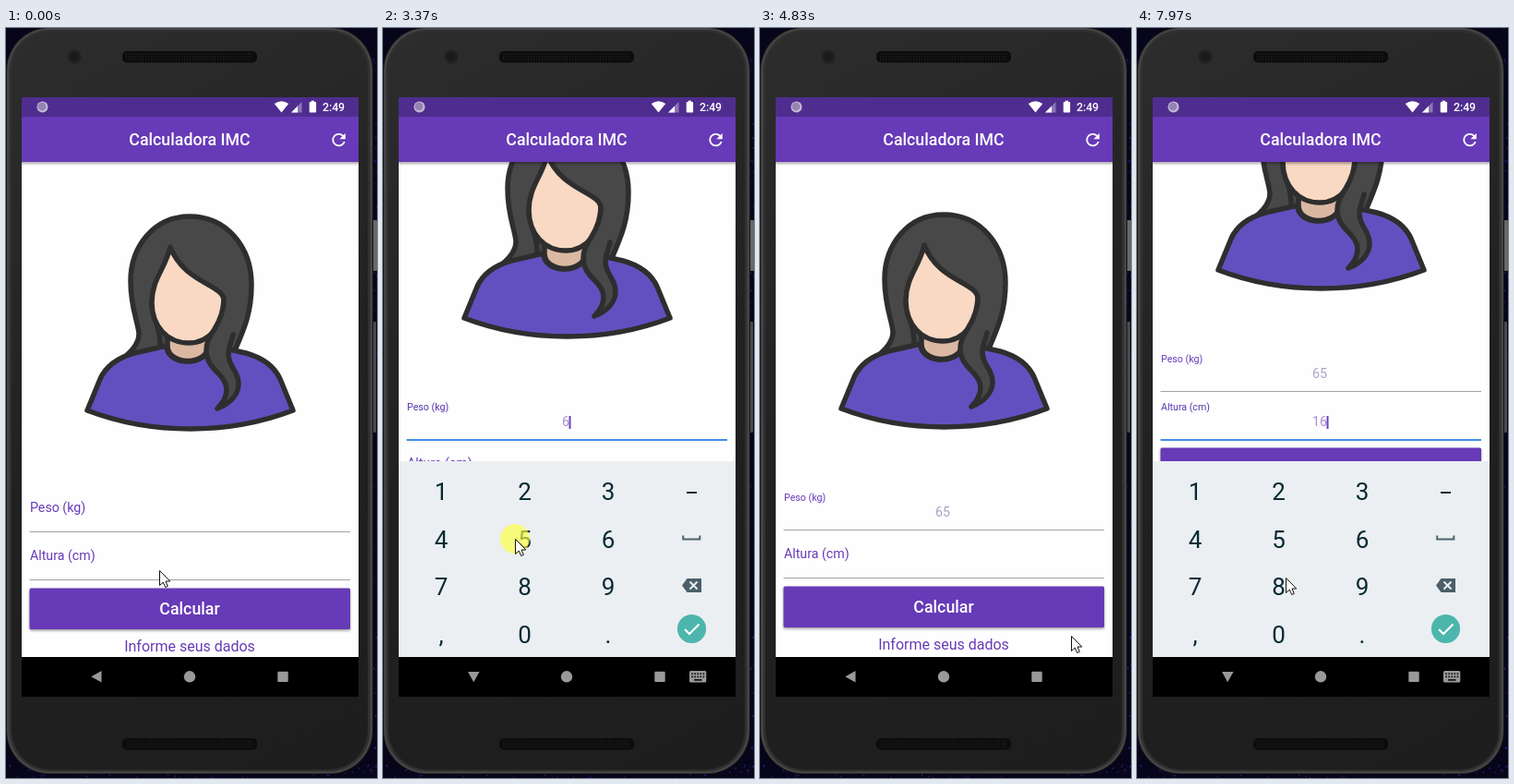
Recreate the animation shown at these times as an HTML page with a canvas. Size 402x812 px, loop 8 s.

```html
<!DOCTYPE html>
<html lang="pt">
<head>
<meta charset="utf-8">
<title>Calculadora IMC</title>
<style>
html, body { margin: 0; width: 100%; height: 100%; overflow: hidden; background: #06051a; }
canvas { display: block; }
</style>
</head>
<body>
<canvas id="stage" width="402" height="812"></canvas>
<script>
const ctx = document.getElementById('stage').getContext('2d');
const LOOP = 8000;
const PURPLE = '#673ab7';
const SCREEN = { x: 17, y: 75, w: 365, h: 649 };
const NAV_TOP = 681;

const clamp = v => Math.max(0, Math.min(1, v));
const ramp = (t, a, b) => clamp((t - a) / (b - a));
const smooth = u => u * u * (3 - 2 * u);
const easeOut = u => 1 - (1 - u) * (1 - u);
const mix = (a, b, u) => a + (b - a) * u;
const within = (t, a, b) => t >= a && t < b;

// Shape helpers
function box(x, y, w, h, color) {
  ctx.fillStyle = color;
  ctx.fillRect(x, y, w, h);
}
function round(x, y, w, h, r, color) {
  ctx.fillStyle = color;
  ctx.beginPath();
  ctx.roundRect(x, y, w, h, r);
  ctx.fill();
}
function disc(x, y, r, color) {
  ctx.fillStyle = color;
  ctx.beginPath();
  ctx.arc(x, y, r, 0, 7);
  ctx.fill();
}
function poly(points, color) {
  ctx.fillStyle = color;
  ctx.beginPath();
  points.forEach(([x, y]) => ctx.lineTo(x, y));
  ctx.closePath();
  ctx.fill();
}
function line(points, color, width = 2) {
  ctx.strokeStyle = color;
  ctx.lineWidth = width;
  ctx.lineCap = 'butt';
  ctx.lineJoin = 'miter';
  ctx.beginPath();
  points.forEach(([x, y]) => ctx.lineTo(x, y));
  ctx.stroke();
}
function text(s, x, y, size, color, align = 'center', weight = 400) {
  ctx.font = `${weight} ${size}px Roboto, sans-serif`;
  ctx.textAlign = align;
  ctx.fillStyle = color;
  ctx.fillText(s, x, y);
}
function outlined(path, fill) {
  ctx.fillStyle = fill;
  ctx.fill(path);
  ctx.strokeStyle = '#2e2e2e';
  ctx.lineWidth = 5.5;
  ctx.lineJoin = ctx.lineCap = 'round';
  ctx.stroke(path);
}

// Timeline: pointer moves are [start, end, x, y]
const MOVES = [
  [50, 330, 166, 525], [1860, 2180, 236, 560], [2700, 3300, 143, 553],
  [3520, 3980, 337, 658], [4980, 5240, 213, 588], [5980, 6450, 69, 509],
  [6860, 7350, 226, 551], [7790, 7970, 161, 595]
];
const CLICKS = [840, 2190, 3350, 4030, 5390, 6470, 7390];
const PRESSES = [[2260, 2400, 2, 1], [3430, 3520, 1, 1], [6540, 6760, 0, 0], [7460, 7600, 2, 1]];
const WEIGHT_FOCUS = 1030, HEIGHT_FOCUS = 5480, HIDE = 4160, RELEASE = 4318;
const TYPED = { weight: [[2340, '6'], [3480, '65']], height: [[6700, '1'], [7570, '16']] };

function pointer(t) {
  let [x, y] = [166, 587];
  for (const [a, b, nx, ny] of MOVES) {
    const u = smooth(ramp(t, a, b));
    x = mix(x, nx, u);
    y = mix(y, ny, u);
  }
  return [x, y];
}

// The page springs back once the keyboard is gone
function scroll(t) {
  if (t < RELEASE) {
    return 98 * easeOut(ramp(t, 1080, 1230)) + 2 * ramp(t, 2340, 2440);
  }
  if (t < 5400) {
    const s = (t - RELEASE) / 1000, fast = 22, slow = 9.08;
    return 100 * (fast * Math.exp(-slow * s) - slow * Math.exp(-fast * s)) / (fast - slow);
  }
  return 150 * easeOut(ramp(t, 5600, 5740)) + 2 * ramp(t, 6700, 6790);
}

function keyboardShown(t) {
  if (t < HIDE) return easeOut(ramp(t, 950, 1200));
  if (t < 5000) return 1 - smooth(ramp(t, HIDE, 4350));
  return easeOut(ramp(t, 5500, 5740));
}

function valueAt(list, t) {
  return list.reduce((v, [at, s]) => t >= at ? s : v, '');
}
function caretOn(list, focus, t) {
  const since = list.reduce((v, [at]) => t >= at ? at : v, focus);
  return Math.floor((t - since) / 500) % 2 === 0;
}

// Phone shell
function drawShell() {
  box(0, 0, 402, 812, '#06051a');
  let seed = 11;
  const rnd = () => (seed = seed * 16807 % 2147483647) / 2147483647;
  for (let i = 0; i < 260; i++) {
    const right = i % 2;
    const x = right ? 394 + rnd() * 8 : rnd() * 402;
    const y = right ? rnd() * 812 : 796 + rnd() * 16;
    box(x, y, 1 + rnd(), 1 + rnd(), `rgba(${50 + rnd() * 50},45,${140 + rnd() * 90},${rnd() * 0.7})`);
  }
  round(397, 208, 5, 55, 1, '#686868');
  round(397, 318, 4, 120, 1, '#4c4c4c');
  round(0, -1, 398, 809, 47, '#151515');
  round(1, 0, 396, 807, 46, '#454545');
  round(3.5, 2, 391, 803, 44, '#303030');
  const body = ctx.createLinearGradient(0, 0, 402, 812);
  body.addColorStop(0, '#2d2d2d');
  body.addColorStop(0.5, '#212121');
  body.addColorStop(1, '#1d1d1d');
  round(6, 4, 386, 799, 42, body);
  for (const y of [25, 769]) {
    round(126, y, 146, 12.5, 5, '#0c0c0c');
    for (let i = 0; i < 46; i++)
      for (let j = 0; j < 3; j++) box(130 + i * 3, y + 2.5 + j * 3, 1.3, 1.3, '#242424');
  }
  disc(74, 31, 7.5, '#202020');
  disc(74, 31, 4.5, '#1a1a1e');
}

const REFRESH = new Path2D('M17.65 6.35C16.2 4.9 14.21 4 12 4c-4.42 0-7.99 3.58-7.99 8s3.57 8 7.99 8c3.73 0 6.84-2.55 7.73-6h-2.08c-.82 2.33-3.04 4-5.65 4-3.31 0-6-2.69-6-6s2.69-6 6-6c1.66 0 3.14.69 4.22 1.78L13 11h7V4z');

function drawBars() {
  const shade = ctx.createLinearGradient(0, 145, 0, 149);
  shade.addColorStop(0, 'rgba(0,0,0,.32)');
  shade.addColorStop(1, 'rgba(0,0,0,0)');
  box(17, 145, 365, 4, shade);
  box(17, 75, 365, 21, '#4f2d8f');
  box(17, 96, 365, 49, PURPLE);

  disc(39.5, 85.5, 6, '#c4b9d6');
  disc(39, 85, 4.4, '#9483b3');
  ctx.fillStyle = '#fff';
  ctx.beginPath();
  ctx.moveTo(298.5, 91.5);
  ctx.lineTo(290.8, 82);
  ctx.quadraticCurveTo(298.5, 76.5, 306.2, 82);
  ctx.fill();
  poly([[309, 91.5], [320.5, 91.5], [320.5, 80]], 'rgba(255,255,255,.35)');
  poly([[309, 91.5], [316, 91.5], [316, 84.5]], '#fff');
  round(328.7, 80, 7.4, 11.6, 1, '#fff');
  box(330.7, 78.7, 3.4, 2, '#fff');
  text('2:49', 355, 90, 12.3, '#fff', 'center', 500);

  text('Calculadora IMC', 199, 127, 17.76, '#fff', 'center', 500);
  ctx.save();
  ctx.translate(360.6, 121.1);
  ctx.scale(0.9, 0.9);
  ctx.translate(-12, -12);
  ctx.fillStyle = '#fff';
  ctx.fill(REFRESH);
  ctx.restore();
}

// Avatar
const HAIR = new Path2D('M199 204C160 204 135 237 135 274C135 303 143 318 144 331C144 343 134 352 124 360L178 348L222 350L248 349C258 326 266 308 266 278C266 237 239 204 199 204Z');
const SHIRT = new Path2D('M174 344L139 352C121 357 108 367 102 380L88 414C122 427 160 434 199.5 434C239 434 277 427 311 414L297 380C291 367 278 357 260 352L220 343C220 367 174 367 174 344Z');
const NECK = new Path2D('M175 330V344C175 366 219 366 219 344V330Z');
const FACE = new Path2D('M178 237C173 260 158 272 158 297C158 323 175 341 198 341C221 341 236 321 236 294C234 277 193 276 178 237Z');
const LOCK = new Path2D('M236 294C236 305 232 316 226 326C221 334 217 340 217 349C217 370 238 374 239 391C239 400 235 406 229 412C244 406 252 396 252 385C252 371 241 367 241 353C241 343 245 339 246 332');
const STRAND = new Path2D('M158 297C158 313 168 323 167 345');

function drawAvatar() {
  outlined(HAIR, '#484848');
  ctx.stroke(STRAND);
  outlined(NECK, '#dbb8a2');
  outlined(SHIRT, '#6350c0');
  outlined(FACE, '#f9d9c3');
  outlined(LOCK, '#484848');
}

// Form
function drawField(label, value, top, up, focused, caret) {
  const size = mix(14.2, 10.65, up);
  text(label, 26, top + mix(524.3, 513.7, up), size, focused ? '#5535ab' : PURPLE, 'left');
  if (value) text(value, 198, top + 531, 14.2, focused ? '#a78fd3' : '#aca3c4');
  if (focused && caret) box(197.5 + value.length * 4, top + 520, 2, 14, '#6a3fb8');
  if (focused) box(25.5, top + 545, 347.5, 2, '#3f8fe9');
  else box(25.5, top + 545, 347.5, 1, '#a5a1a8');
}

function drawForm(t) {
  ctx.save();
  ctx.translate(0, -Math.round(scroll(t)));
  drawAvatar();
  drawField('Peso (kg)', valueAt(TYPED.weight, t), 0, smooth(ramp(t, WEIGHT_FOCUS - 60, WEIGHT_FOCUS + 140)),
    within(t, WEIGHT_FOCUS - 60, HIDE + 100), caretOn(TYPED.weight, WEIGHT_FOCUS, t));
  drawField('Altura (cm)', valueAt(TYPED.height, t), 52, smooth(ramp(t, HEIGHT_FOCUS - 10, HEIGHT_FOCUS + 190)),
    t >= HEIGHT_FOCUS, caretOn(TYPED.height, HEIGHT_FOCUS, t));
  ctx.shadowColor = 'rgba(0,0,0,.4)';
  ctx.shadowBlur = 3;
  ctx.shadowOffsetY = 1.5;
  round(25.5, 606.5, 347.5, 44.5, 1.5, PURPLE);
  ctx.shadowColor = 'transparent';
  text('Calcular', 199, 635, 17.76, '#fff', 'center', 500);
  text('Informe seus dados', 199, 675, 16, PURPLE);
  ctx.restore();
}

// Keyboard
const COLS = [63, 153.5, 244, 334.5];
const ROWS = [502, 553.5, 605, 656.5];
const KEYS = ['123', '456', '789', ',0.'];
const KEY_BG = '#ebeff2', KEY_INK = '#062a32';

function drawKeyboard(t) {
  const shown = keyboardShown(t);
  if (shown <= 0) return;
  ctx.save();
  ctx.globalAlpha = shown;
  ctx.translate(0, 126 * (1 - shown));
  box(17, 469, 365, NAV_TOP - 469, KEY_BG);
  for (const [a, b, col, row] of PRESSES)
    if (within(t, a, b)) box(COLS[col] - 45, ROWS[row] - 27, 90.5, 51.5, '#dbe0e1');
  KEYS.forEach((keys, row) => [...keys].forEach((key, col) =>
    text(key, COLS[col], ROWS[row] + 9.2, 26, KEY_INK)));
  box(329, 502, 11, 2, KEY_INK);
  line([[325.2, 549.5], [325.2, 553.5], [343.3, 553.5], [343.3, 549.5]], '#4d626b');
  poly([[324, 603.5], [329.5, 596], [345, 596], [345, 611], [329.5, 611]], '#4a5f69');
  line([[332.5, 599.5], [340.5, 607.5]], KEY_BG);
  line([[340.5, 599.5], [332.5, 607.5]], KEY_BG);
  disc(334.5, 650.5, 15.6, within(t, 4060, HIDE) ? '#429e95' : '#4db6ac');
  line([[327, 651], [332, 656], [342.5, 645.5]], '#fff');
  ctx.restore();
}

function drawNavIcons(t) {
  const color = 'rgba(255,255,255,.6)';
  const open = within(t, 950, HIDE + 60) || t >= 5500;
  if (open) poly([[92, 697], [104.5, 697], [98.2, 708.3]], color);
  else poly([[92.3, 702.3], [103.5, 696], [103.5, 708.6]], color);
  disc(199, 702.3, 6.2, color);
  round(294.3, 696.7, 11.4, 11.4, 1, color);
  if (!open) return;
  round(332, 696, 18.3, 12.6, 1.5, color);
  for (let i = 0; i < 5; i++)
    for (let j = 0; j < 2; j++) box(334.2 + i * 3.1, 698.3 + j * 3.2, 1.6, 1.8, '#111');
  box(337, 705, 8.5, 1.7, '#111');
}

const ARROW = new Path2D('M0 0V16L3.8 12.6L6.2 18L8.8 16.9L6.5 11.5H11.3Z');

function drawPointer(t) {
  const [x, y] = pointer(t).map(Math.round);
  if (CLICKS.some(at => within(t, at, at + 90))) disc(x, y, 16, 'rgba(255,255,60,.65)');
  ctx.save();
  ctx.translate(x + 0.5, y + 0.5);
  ctx.fillStyle = '#fff';
  ctx.fill(ARROW);
  ctx.strokeStyle = '#111';
  ctx.lineWidth = 1;
  ctx.lineJoin = 'miter';
  ctx.stroke(ARROW);
  ctx.restore();
}

function draw(t) {
  drawShell();
  ctx.save();
  ctx.beginPath();
  ctx.rect(SCREEN.x, SCREEN.y, SCREEN.w, SCREEN.h);
  ctx.clip();
  box(SCREEN.x, SCREEN.y, SCREEN.w, SCREEN.h, '#fefefe');
  drawForm(t);
  drawBars();
  box(17, NAV_TOP, 365, 43, '#000');
  drawKeyboard(t);
  drawNavIcons(t);
  ctx.restore();
  drawPointer(t);
}

const start = performance.now();
function tick() {
  draw((performance.now() - start) % LOOP);
  requestAnimationFrame(tick);
}
tick();
</script>
</body>
</html>
```
